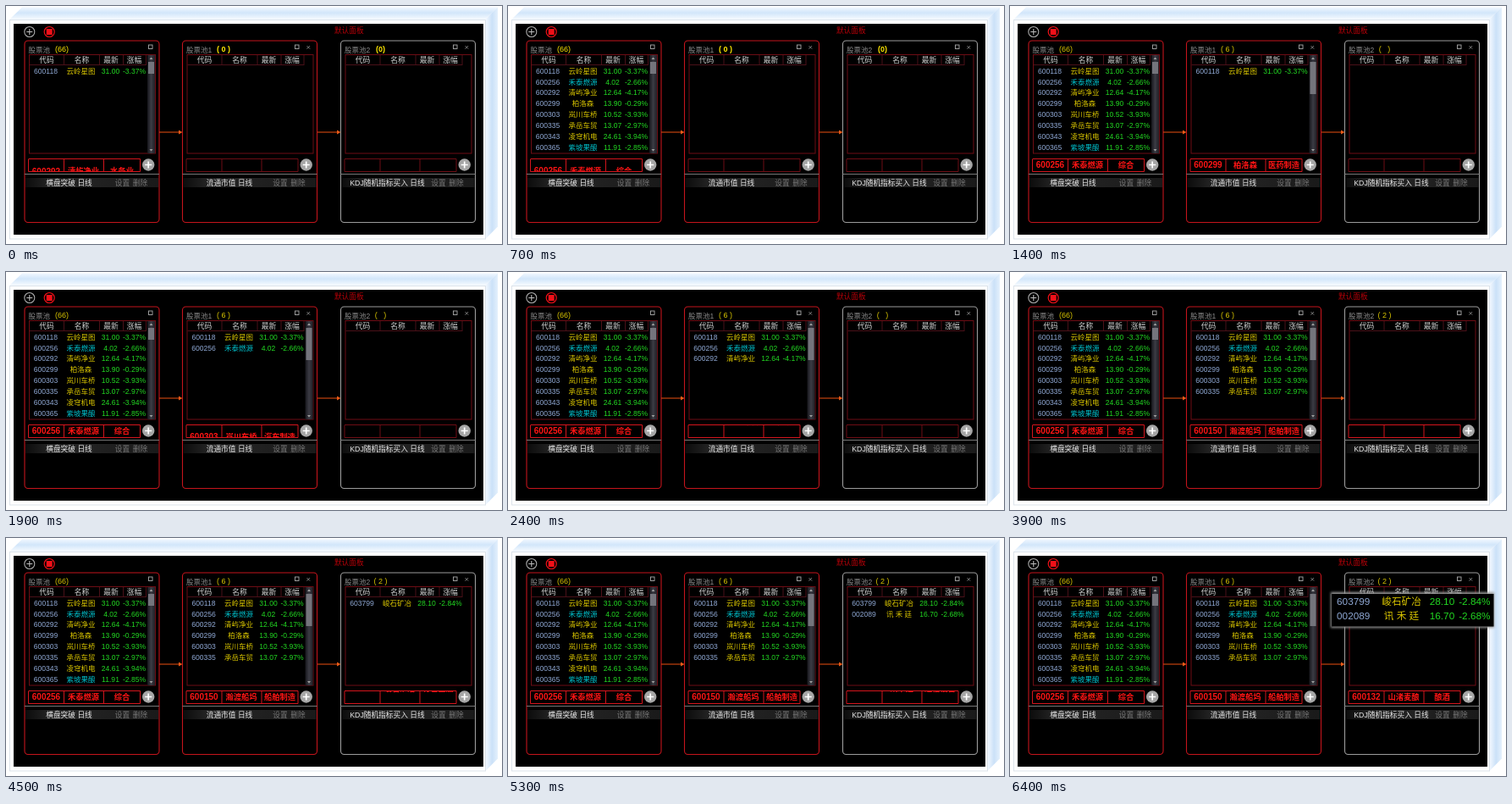
An HTML page that plays this animation: 586 by 281 pixels, repeating every 8000 ms.

```html
<!DOCTYPE html>
<html lang="zh-CN">
<head>
<meta charset="utf-8">
<style>
  html, body { margin: 0; width: 100%; height: 100%; overflow: hidden; background: #fff; }
  svg { display: block; width: 586px; height: 281px; }
  text { font-family: "Liberation Sans", "Noto Sans CJK SC", "Noto Sans CJK", sans-serif; white-space: pre; }
</style>
</head>
<body>
<svg id="stage" viewBox="0 0 586 281" xmlns="http://www.w3.org/2000/svg">
  <defs>
    <linearGradient id="topBevel" x1="0" y1="0" x2="0" y2="1">
      <stop offset="0" stop-color="#f0f7ff"/><stop offset=".45" stop-color="#d2e6fa"/><stop offset="1" stop-color="#f6faff"/>
    </linearGradient>
    <linearGradient id="sideBevel">
      <stop offset="0" stop-color="#f6faff"/><stop offset=".55" stop-color="#cbe1f8"/><stop offset="1" stop-color="#e4f0fc"/>
    </linearGradient>
    <linearGradient id="track">
      <stop offset="0" stop-color="#17171c"/><stop offset=".5" stop-color="#3b3b44"/><stop offset="1" stop-color="#202026"/>
    </linearGradient>
    <linearGradient id="bar">
      <stop offset="0" stop-color="#0c0c0c"/><stop offset=".2" stop-color="#262626"/><stop offset="1" stop-color="#1a1a1a"/>
    </linearGradient>
    <clipPath id="tickerClip"><rect x="26" y="181" width="132" height="14"/></clipPath>
    <filter id="soft" x="-10%" y="-30%" width="120%" height="160%"><feGaussianBlur stdDeviation="1.5"/></filter>
  </defs>
</svg>
<script>
const LOOP = 8000, STEP = 100, POPUP_AT = 6400, COUNTS_AT = 1000, LAST_POOL_AT = 3800;
const ROW_PITCH = 12.85, POOL_PITCH = 187;
const TICKER = { from: 202, rest: 187.5, speed: 0.0363 };
const RED = '#c4141c', DIM = '#6e0d14', YELLOW = '#d8c400', CYAN = '#00c0cc';

const STOCKS = [
  ['600118', '云岭星图', '31.00', '-3.37%'],
  ['600256', '禾泰燃源', '4.02', '-2.66%', CYAN],
  ['600292', '清屿净业', '12.64', '-4.17%'],
  ['600299', '柏洛森', '13.90', '-0.29%'],
  ['600303', '岚川车桥', '10.52', '-3.93%'],
  ['600335', '承岳车贸', '13.07', '-2.97%'],
  ['600343', '凌穹机电', '24.61', '-3.94%'],
  ['600365', '紫坡果酿', '11.91', '-2.85%', CYAN],
];
const PICKS = [
  ['603799', '峻石矿冶', '28.10', '-2.84%'],
  ['002089', '讯 禾 廷', '16.70', '-2.68%'],
];

// reelEvery is the time between two ticker entries rising through the cell.
const POOLS = [
  { title: '股票池', rule: '横盘突破 日线', ruleX: 74.5, countX: 66, border: RED, thumb: 14,
    rows: STOCKS, firstRow: 0, rowEvery: 100, start: 0, reelStart: -190, reelEvery: 690,
    count: () => '(66)',
    reel: [['600292', '清屿净业', '水务业'], ['600256', '禾泰燃源', '综合']] },
  { title: '股票池1', rule: '流通市值 日线', ruleX: 77.5, countX: 70.5, border: RED, thumb: 38,
    rows: STOCKS.slice(0, 6), firstRow: 1300, rowEvery: 500, start: COUNTS_AT, reelStart: 1010, reelEvery: 690,
    count: t => t < COUNTS_AT ? '( 0 )' : '( 6 )',
    reel: [['600299', '柏洛森', '医药制造'], ['600303', '岚川车桥', '汽车制造'],
           ['600343', '凌穹机电', '通用设备'], ['600150', '瀚渡船坞', '船舶制造']] },
  { title: '股票池2', rule: 'KDJ随机指标买入 日线', ruleX: 77, countX: 69, border: '#9c9c9c', thumb: 0,
    rows: PICKS, firstRow: 4200, rowEvery: 500, start: LAST_POOL_AT, reelStart: 3830, reelEvery: 800,
    count: t => t < COUNTS_AT ? '(0)' : t < LAST_POOL_AT ? '(   )' : '( 2 )',
    reel: [['603799', '峻石矿冶', '有色金属'], ['002089', '讯禾廷', '通信设备'], ['600132', '山渚麦酿', '酿酒']] },
];

function add(parent, tag, attrs = {}, content) {
  const node = document.createElementNS('http://www.w3.org/2000/svg', tag);
  for (const key in attrs) node.setAttribute(key, attrs[key]);
  if (content !== undefined) node.textContent = content;
  return parent.appendChild(node);
}
const group = (parent, attrs) => add(parent, 'g', attrs);
const path = (parent, d, stroke, width = 1, fill = 'none') =>
  add(parent, 'path', { d, stroke, 'stroke-width': width, fill });
const rect = (parent, x, y, width, height, attrs) => add(parent, 'rect', { x, y, width, height, ...attrs });
// Text is placed by its vertical middle.
const label = (parent, x, y, content, fill, size = 8.6, anchor = 'middle', attrs = {}) =>
  add(parent, 'text', { x, y: y + size * 0.36, fill, 'font-size': size, 'text-anchor': anchor, ...attrs }, content);
const show = (node, visible) => node.setAttribute('visibility', visible ? 'visible' : 'hidden');

function drawRow(parent, [code, name, price, change, tint = YELLOW], index) {
  const row = group(parent), y = 76.7 + index * ROW_PITCH;
  label(row, 47, y, code, '#8fa8d4');
  label(row, 88.5, y, name, tint, 8.5);
  label(row, 123.5, y, price, '#22d822');
  label(row, 151.5, y, change, '#22d822');
  return row;
}

function drawScrollbar(parent, thumb) {
  const bar = group(parent);
  rect(bar, 167, 58, 9, 116, { fill: 'url(#track)' });
  rect(bar, 168, 66, 7, thumb, { fill: '#74747c' });
  path(bar, 'M169.5 63l2-2.5 2 2.5zM169.5 169l2 2.5 2-2.5z', 'none', 0, '#a0a0a0');
  return bar;
}

function drawPool(parent, pool, index) {
  const g = group(parent, { transform: `translate(${index * POOL_PITCH - (index ? 0.5 : 0)} 0)` });
  rect(g, 22, 41, 159, 214.5, { rx: 4, fill: '#000', stroke: pool.border, 'stroke-width': 1.1 });
  label(g, 26.5, 51.5, pool.title, '#8c8c8c', 8.5, 'start');
  const count = label(g, pool.countX, 51.2, '', YELLOW, 9);
  rect(g, index ? 155 : 168.5, 46, 4.5, 4.5, { fill: 'none', stroke: '#aaa', 'stroke-width': .9 });
  if (index) path(g, 'M169 47l3.6 3.6m0-3.6l-3.6 3.6', '#999', .8);

  rect(g, 27.5, 57.5, 149, 116.5, { fill: 'none', stroke: DIM });
  path(g, 'M68.5 58v11M110.5 58v11M138.5 58v11M165.5 58v11M28 69.5H166', '#4a1018');
  [['代码', 48], ['名称', 89.5], ['最新', 124], ['涨幅', 151.5]]
    .forEach(([text, x]) => label(g, x, 63.5, text, '#d0d0d0', 8.8));
  const scrollbar = pool.thumb ? drawScrollbar(g, pool.thumb) : null;
  const rows = pool.rows.map((stock, i) => drawRow(g, stock, i));

  const cell = path(g, 'M26.5 181V195.5H158.5V180.5H26.5M68.5 181V195M115.5 181V195', DIM);
  const slot = group(g, { 'clip-path': 'url(#tickerClip)' });
  const reel = pool.reel.map(item => {
    const line = group(slot);
    item.forEach((text, i) =>
      label(line, [47.5, 91.5, 137][i], 0, text, '#ff1414', i ? 9.3 : 10, 'middle', { 'font-weight': 'bold' }));
    return line;
  });

  add(g, 'circle', { cx: 168.2, cy: 187.5, r: 7.2, fill: '#a6a6a6' });
  path(g, 'M164.2 187.5h8M168.2 183.5v8', '#fff', 1.7);
  path(g, 'M22 198.5H181', '#777');
  rect(g, 23, 203, 157, 11, { fill: 'url(#bar)' });
  label(g, pool.ruleX, 208.5, pool.rule, '#e8e8e8', 8.7);
  label(g, 137.5, 208.5, '设置', '#777', 8.7);
  label(g, 158.5, 208.5, '删除', '#777', 8.7);

  return t => {
    count.textContent = pool.count(t);
    count.setAttribute('fill', t < COUNTS_AT ? '#ffe800' : YELLOW);
    count.setAttribute('font-weight', index && t < COUNTS_AT ? 'bold' : 'normal');
    if (scrollbar) show(scrollbar, t >= pool.start);
    rows.forEach((row, i) => show(row, t >= pool.firstRow + i * pool.rowEvery));
    cell.setAttribute('stroke', t >= pool.start ? '#d4141c' : DIM);
    reel.forEach((line, i) => {
      let y = TICKER.from - (t - pool.reelStart - i * pool.reelEvery) * TICKER.speed;
      if (i === reel.length - 1) y = Math.max(TICKER.rest, y);
      line.setAttribute('transform', `translate(0 ${y})`);
      show(line, t >= pool.start);
    });
  };
}

function drawBackdrop(parent) {
  path(parent, 'M4 16L19 1.5H581L566 16Z', 'none', 0, 'url(#topBevel)');
  path(parent, 'M566 16L581 1.5V260.5L566 275.5Z', 'none', 0, 'url(#sideBevel)');
  rect(parent, 4.5, 16.5, 562, 258.5, { fill: '#fff', stroke: '#dce3ea' });
  rect(parent, 9, 21, 555, 249, { fill: '#000' });
  add(parent, 'circle', { cx: 27.8, cy: 30.5, r: 6, fill: 'none', stroke: '#aaa', 'stroke-width': 1.1 });
  path(parent, 'M24.3 30.5h7M27.8 27v7', '#bbb', 1.1);
  add(parent, 'circle', { cx: 51.2, cy: 30.5, r: 6, fill: 'none', stroke: '#f01018', 'stroke-width': 1.2 });
  rect(parent, 47.7, 27, 7, 7, { fill: '#f01018' });
  label(parent, 405.3, 29, '默认面板', '#b80008', 8.7);
}

function drawPopup(parent) {
  const popup = group(parent);
  rect(popup, 379, 64, 193, 42, { fill: '#999', filter: 'url(#soft)' });
  rect(popup, 380, 66, 191.5, 38.5, { fill: '#000' });
  const zoom = group(popup, { transform: 'translate(386.5 75) scale(1.37) translate(-33 -77)' });
  PICKS.forEach((stock, i) => drawRow(zoom, stock, i));
  return popup;
}

const stage = document.getElementById('stage');
drawBackdrop(stage);
const updates = POOLS.map((pool, i) => drawPool(stage, pool, i));
for (const x of [181, 368]) {
  path(stage, `M${x} 149H${x + 25}`, '#d84a10', 1.1);
  path(stage, `M${x + 23} 146.5l4.5 2.5-4.5 2.5z`, 'none', 0, '#e85a18');
}
const popup = drawPopup(stage);

function render(elapsed) {
  const t = Math.floor((elapsed % LOOP) / STEP) * STEP;
  updates.forEach(update => update(t));
  show(popup, t >= POPUP_AT);
}

const begin = performance.now();
function tick() {
  render(performance.now() - begin);
  requestAnimationFrame(tick);
}
render(0);
requestAnimationFrame(tick);
</script>
</body>
</html>
```
